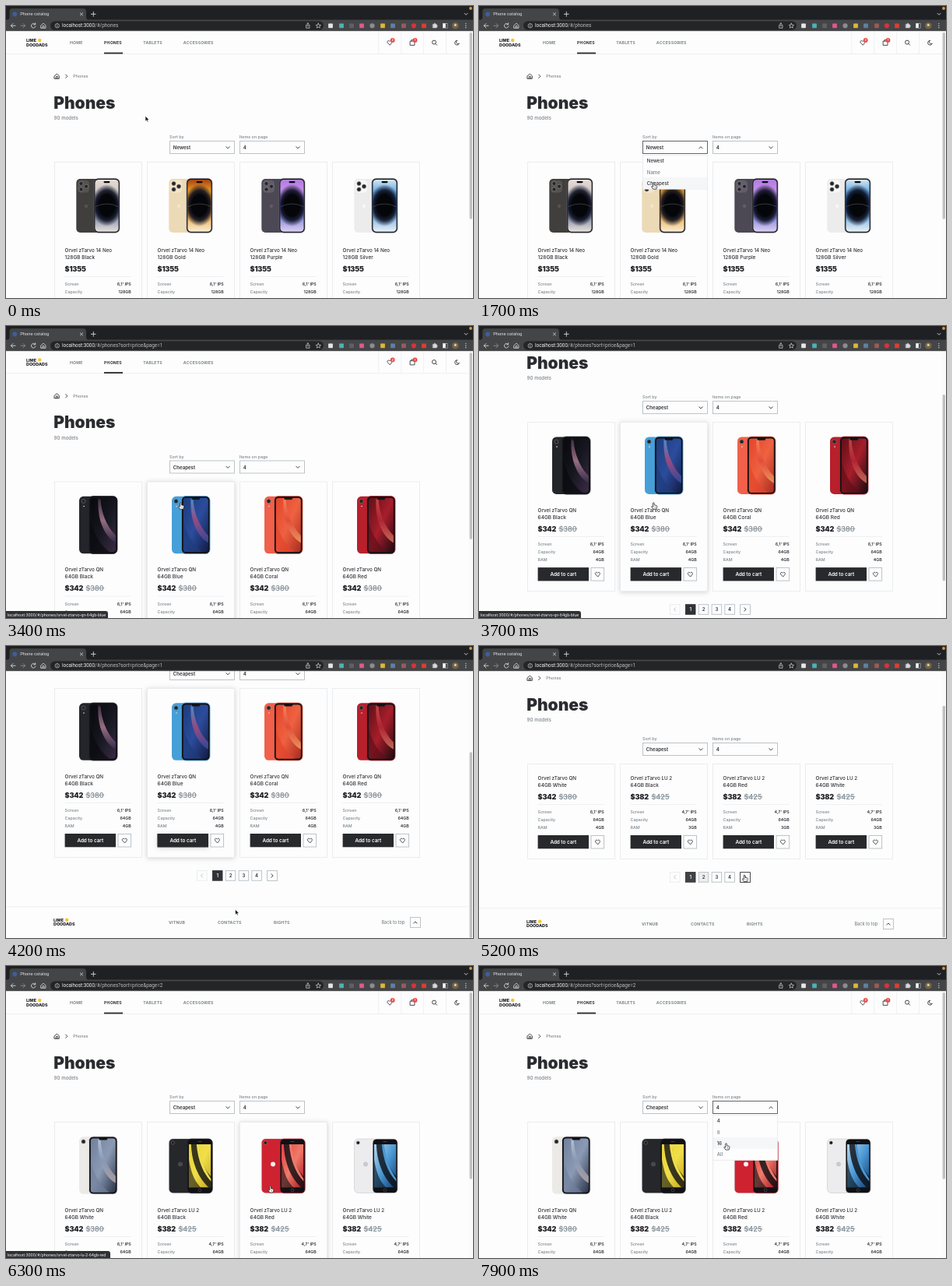
Write an HTML page that moves like this. It is 600 px wide and 375 px high and loops after 8000 ms.

```html
<!DOCTYPE html>
<html lang="en">
<head>
<meta charset="utf-8">
<title>Phone catalog</title>
<style>
html, body { margin: 0; width: 100%; height: 100%; overflow: hidden; background: #fdfdfd; }
svg { display: block; width: 600px; height: 375px; font-family: Inter, sans-serif; }
.url { font-family: Roboto, sans-serif; }
.caps { letter-spacing: .2px; }
.shade { filter: drop-shadow(0 1px 3px rgba(0, 0, 0, .17)); }
</style>
</head>
<body>
<svg id="stage" viewBox="0 0 600 375"></svg>
<script>
const LOOP = 8000, FOLD = 95;
const DARK = '#313237', GREY = '#7b848a', LINE = '#e8ebed', EDGE = '#b4bdc3', BAR = '#444547';
const CARD_X = [62, 181, 300, 419];
const stage = document.getElementById('stage');

// drawing helpers
const text = (x, y, s, size, weight = 500, fill = DARK, extra = '') =>
  `<text x="${x}" y="${y}" font-size="${size}" font-weight="${weight}" fill="${fill}" ${extra}>${s}</text>`;
const rect = (x, y, w, h, fill, extra = '') =>
  `<rect x="${x}" y="${y}" width="${w}" height="${h}" fill="${fill}" ${extra}/>`;
const dot = (x, y, r, fill, extra = '') => `<circle cx="${x}" cy="${y}" r="${r}" fill="${fill}" ${extra}/>`;
const path = (d, stroke = DARK, width = 1, extra = 'fill="none"') =>
  `<path d="${d}" stroke="${stroke}" stroke-width="${width}" stroke-linecap="round" stroke-linejoin="round" ${extra}/>`;
const box = (x, y, w, h, stroke, extra = '') => rect(x, y, w, h, '#fdfdfd', `stroke="${stroke}" stroke-width=".9" ${extra}`);
const group = (id, s, extra = '') => `<g id="${id}" ${extra}>${s}</g>`;
const at = (x, y, s) => `<g transform="translate(${x} ${y})">${s}</g>`;
const chevron = (x, y, dx, dy, color = DARK) => dy
  ? path(`M${x - 2.2} ${y - dy}L${x} ${y + dy}L${x + 2.2} ${y - dy}`, color, .9)
  : path(`M${x - dx} ${y - 2.2}L${x + dx} ${y}L${x - dx} ${y + 2.2}`, color, .9);
const heart = (x, y) => at(x, y, path('M0 2.8L-2.7 0C-4 -1.7 -1.6 -4 0 -1.8C1.6 -4 4 -1.7 2.7 0Z', DARK, .85));

let defs = '', gradients = 0;
function gradient(colors, diagonal) {
  const id = 'g' + gradients++;
  const stops = colors.map((c, i) => `<stop offset="${i / (colors.length - 1)}" stop-color="${c}"/>`).join('');
  defs += `<linearGradient id="${id}" x2="${diagonal ? 1 : 0}" y2="1">${stops}</linearGradient>`;
  return `url(#${id})`;
}

// phone pictures, relative to the left edge of a card
function proPhone(back, lens, screen) {
  const lenses = [[34.5, 228], [34.5, 235.5], [41, 231.7]].map(([x, y]) =>
    dot(x, y, 2.6, '#24252a', 'stroke="#8b8785" stroke-width=".7"')).join('');
  const panel = fill => rect(52.4, 222.9, 30.2, 66.9, fill, 'rx="4.5"');
  return rect(28.3, 222, 30, 69, back, 'rx="5"') + rect(30, 223.7, 15, 16, lens, 'rx="4.5"') + lenses +
    dot(41, 257, 2.2, lens) +
    rect(51, 221.5, 33, 69.7, '#15161a', 'rx="5.5" stroke="#77767a" stroke-width=".5"') +
    panel(gradient(screen)) + panel('url(#core)') +
    path('M53 257.5Q67.5 250.5 82 257.5', '#c3c8de', .5, 'fill="none" opacity=".5"') +
    rect(63.5, 225, 8, 2.2, '#08080a', 'rx="1.1"');
}
function xrPhone(back, screen, glow) {
  return rect(32, 219.3, 32, 73.5, back, 'rx="5.5"') + dot(37.5, 225.5, 2.5, '#222328', 'stroke="#777" stroke-width=".6"') +
    dot(38, 232, .8, '#e8e4d8') +
    rect(44.5, 219, 36.5, 74, '#111216', `rx="5.5" stroke="${back}" stroke-width=".8"`) +
    at(46.6, 221.2, `<g clip-path="url(#xr)">${rect(0, 0, 32.3, 69.6, gradient(screen, true))}
      <path d="M10 0C8 28 18 50 33 58V49C23 40 13 20 13 0Z" fill="${gradient(glow)}" opacity=".75"/>
      <path d="M0 28C4 48 14 62 25 70H0Z" fill="${screen[0]}" opacity=".65"/></g>`) +
    path('M57 220.8H68.5L67.3 223.3H58.2Z', '#111216', .4, 'fill="#111216"');
}
function sePhone(back, mark, face, colors) {
  return rect(28.5, 222, 30, 69.5, back, 'rx="5" stroke="#999" stroke-width=".3"') + dot(33.3, 227, 2.1, '#17181c', 'stroke="#888" stroke-width=".5"') +
    dot(43, 254.5, 3, mark) +
    rect(52, 222, 32.2, 69.7, face, `rx="5" stroke="${back}" stroke-width=".8"`) +
    at(53.8, 229, `<g clip-path="url(#se)">${rect(0, 0, 28.6, 55.5, gradient(colors, true))}
      <path d="M3 0C4 24 12 43 26 56H29V42C20 32 13 16 13 0Z" fill="#0d0e13" opacity=".8"/>
      <path d="M10 0C12 22 19 38 29 48V45C21 33 14 17 13 0Z" fill="${colors[1]}"/>
      <path d="M0 18C3 38 8 48 16 56H0Z" fill="#0d0e13" opacity=".6"/></g>`) +
    dot(68, 288, 1.9, 'none', 'stroke="#777" stroke-width=".4"') + rect(65.5, 225.3, 5, .7, '#555');
}

const PRO = 'zTarvo 14 Neo', XR = 'zTarvo QN', SE = 'zTarvo LU 2';
const pro = (color, ...look) => ({ model: PRO, spec: '128GB ' + color, price: '$1355', size: "6,1' IPS", mem: '128GB', ram: '6GB', pic: proPhone(...look) });
const xr = (color, ...look) => ({ model: XR, spec: '64GB ' + color, price: '$342', was: '$380', size: "6,1' IPS", mem: '64GB', ram: '4GB', pic: xrPhone(...look) });
const se = (color, ...look) => ({ model: SE, spec: '64GB ' + color, price: '$382', was: '$425', size: "4,7' IPS", mem: '64GB', ram: '3GB', pic: sePhone(...look) });

const sets = [
  [
    pro('Black', '#413f3d', '#55524f', ['#e4dcd6', '#cfc6c4', '#4a5578', '#8f97ad', '#e6dfda']),
    pro('Gold', '#ecd9b6', '#f3e5ca', ['#a8430f', '#f2a92f', '#e2861f', '#f0b867', '#f8ecd2']),
    pro('Purple', '#4c4854', '#625c6b', ['#b27be0', '#c795ee', '#5a50b0', '#8f92dc', '#dccdf2']),
    pro('Silver', '#ececec', '#f7f7f6', ['#d5e6f3', '#5fa6e4', '#2f6fc0', '#8cbce8', '#e8f0f5'])
  ], [
    xr('Black', '#24252a', ['#08090c', '#15161f', '#3a2c44'], ['#4d3554', '#c08aa0', '#342b50']),
    xr('Blue', '#479fd8', ['#1c3d7c', '#2c4c9c', '#121c46'], ['#56a5e4', '#b94a74', '#3651ad']),
    xr('Coral', '#f0604a', ['#e5432c', '#ee6240', '#a92b20'], ['#f79a66', '#e0473a', '#f6b36c']),
    xr('Red', '#b8202c', ['#5f0f18', '#a61e2b', '#220a10'], ['#e1584f', '#b42636', '#e88a6d'])
  ], [
    xr('White', '#eceae6', ['#70809d', '#8b9ab4', '#2b3448'], ['#cbd6e6', '#8796b4', '#c9b8b2']),
    se('Black', '#26272b', '#47484d', '#101115', ['#e8d236', '#f0df4a', '#c3a51c']),
    se('Red', '#cf2231', '#f6eeee', '#101115', ['#e2423f', '#f07a6a', '#a4141f']),
    se('White', '#ececee', '#c9cace', '#101115', ['#b9d8ea', '#4a98d4', '#123a6c'])
  ]
];

function card(p, i) {
  const row = (y, name, value) => text(13.6, y, name, 5.3, 500, GREY) +
    text(98.8, y, value, 5.3, 600, DARK, 'text-anchor="end"');
  const old = p.was ? text(40.5, 340.5, p.was, 9, 600, '#89939a') + rect(40.3, 336.8, 24, .8, '#89939a') : '';
  const info = text(13.6, 315.6, 'Orvel ' + p.model, 6.3) + text(13.6, 324.8, p.spec, 6.5) +
    text(13.6, 340.5, p.price, 9.1, 900, '#222327', 'letter-spacing="-.2"') + old + rect(13.6, 347.2, 85, .7, LINE) +
    row(359, 'Screen', p.size) + row(369, 'Capacity', p.mem) + row(379, 'RAM', p.ram) +
    rect(13.6, 387, 65.4, 17.3, '#28292c') +
    text(46.3, 398, 'Add to cart', 6.3, 600, '#fff', 'text-anchor="middle"') +
    box(82, 387.4, 16.6, 16.6, EDGE) + heart(90.4, 395.9);
  return at(CARD_X[i], 0, `<g class="pic">${p.pic}</g><g class="fold">${info}</g>`).replace('translate(', 'translate(');
}

const logo = (x, y) => text(x, y, 'LIME', 5.4, 800, '#1f2024') + text(x, y + 5.5, 'DOODADS', 5.4, 800, '#1f2024') +
  dot(x + 17.2, y - 2, 2.3, '#f3c73c');
const caps = (x, y, s, fill = GREY) => text(x, y, s, 5.2, 700, fill, 'class="caps"');
const home = (x, y, color, width) => path(`M${x - 3} ${y - .4}L${x} ${y - 3}L${x + 3} ${y - .4}V${y + 3.1}H${x - 3}ZM${x - 1} ${y + 3}V${y + .4}H${x + 1}V${y + 3}`, color, width);
const badge = (x, n) => dot(x, 43.9, 2.9, '#eb4848') + text(x, 45.3, n, 3.8, 600, '#fff', 'text-anchor="middle"');

function header() {
  return rect(0, 32, 600, 29.5, '#fdfdfd') + rect(0, 61, 600, .8, LINE) + logo(26, 46) +
    caps(82, 49, 'HOME') + caps(126, 49, 'PHONES', DARK) + caps(176.3, 49, 'TABLETS') + caps(227.8, 49, 'ACCESSORIES') +
    rect(126, 59.6, 24, 1.9, DARK) +
    [478.5, 507.5, 536, 565].map(x => rect(x, 33, .7, 28, LINE)).join('') +
    heart(493, 47.2) + badge(496.7, 2) +
    path('M519.5 45.2H525V50.4H519.5ZM520.8 45V43.6H523.7V45', DARK, .85) + badge(525.5, 1) +
    dot(550, 46.6, 2.5, 'none', `stroke="${DARK}" stroke-width=".9"`) + path('M552 48.6L553.6 50.2', DARK, .9) +
    path('M579.4 44.3A2.9 2.9 0 1 0 582.3 48A2.3 2.3 0 0 1 579.4 44.3Z', DARK, .85);
}

const PAGER_X = [265, 281.8, 298.7, 315.4];
function lower() {
  const pages = PAGER_X.map((x, i) => box(x + .4, 434.6, 12.6, 12.6, EDGE, `id="p${i}"`) +
    text(x + 6.7, 443.1, i + 1, 6, 600, DARK, `text-anchor="middle" id="n${i}"`)).join('');
  return box(245.4, 434.6, 12.6, 12.6, LINE) + chevron(251.6, 440.9, -1.1, 0, EDGE) + pages +
    box(335.6, 434.6, 12.8, 12.8, EDGE, 'id="next"') + chevron(342, 440.9, 1.1, 0) +
    rect(0, 480.4, 600, .8, LINE) + logo(61, 499.8) +
    caps(209, 503, 'VITNUB') + caps(272, 503, 'CONTACTS') + caps(344, 503, 'RIGHTS') +
    text(482.5, 503, 'Back to top', 5.5, 500, GREY) + box(519.4, 494.6, 13, 13, EDGE) + chevron(525.9, 501, 0, -1.1);
}

function select(id, x, label) {
  return text(x, 170, label, 5.4, 500, GREY) + box(x + .5, 173.5, 83, 16, EDGE, `id="${id}Box"`) +
    text(x + 4.8, 184, '', 6.1, 600, DARK, `id="${id}Text"`) +
    group(id + 'Down', chevron(x + 75, 181.8, 0, 1.1)) + group(id + 'Up', chevron(x + 75, 181.8, 0, -1.1));
}
const ROW = 14.3, MENU_Y = 191.6;
function menu(id, x, items) {
  return group(id + 'Menu', box(x + .5, MENU_Y, 83, items.length * ROW + .6, LINE) +
    items.map((s, i) => rect(x + 1, MENU_Y + i * ROW, 82, ROW, '#f5f6f7', `id="${id}Bg${i}"`) +
      text(x + 5.8, MENU_Y + i * ROW + 9.6, s, 6.1, 500, GREY, `id="${id}Item${i}"`)).join(''));
}

function chrome() {
  const pale = '#d5d7da', dim = '#8b8d91';
  const addons = [[417, '#e4e5e6'], [431, '#4fb0b4'], [444, '#5e6064'], [457, '#e0568f'], [470.5, '#8a8c90'], [484, '#d9b935'],
    [497, '#5d7fa3'], [511, '#9a5a58'], [524, '#d8323a'], [537, '#d9402f']];
  return rect(0, 0, 600, 18, '#1f2023') + rect(0, 17.6, 600, 14.6, BAR) +
    `<path d="M1 18Q4.5 18 4.5 14V7Q4.5 3.2 8 3.2H99.5Q103 3.2 103 7V14Q103 18 106.5 18Z" fill="${BAR}"/>` +
    dot(11.2, 10.4, 3, '#3a5f9e') + text(18.2, 12.4, 'Phone catalog', 5.8, 400, '#dfe1e4', 'class="url"') +
    path('M95.4 8.8L98.6 12M98.6 8.8L95.4 12', pale, .8) + path('M109.4 10.4H115.2M112.3 7.5V13.3', pale, .9) +
    path('M589 9.4L591 11.4L593 9.4', pale, .9) + dot(597, 3, 1.9, '#ef9431') +
    path('M12 25.3H6.5M9 22.6L6.3 25.3L9 28', pale, .9) + path('M19 25.3H24.5M22 22.6L24.7 25.3L22 28', dim, .9) +
    path('M37.3 23.4A2.8 2.8 0 1 0 38 26M37.7 21.8V23.8H35.7', pale, .9) + home(48, 25.2, pale, .8) +
    rect(57, 19.4, 351, 11.4, '#242527', 'rx="5.7"') +
    dot(65.8, 25.3, 2.7, 'none', `stroke="${pale}" stroke-width=".7"`) + rect(65.4, 24.9, .8, 1.8, pale) + rect(65.4, 23.5, .8, .8, pale) +
    text(72, 27.4, '<tspan fill="#f1f2f4">localhost:3000</tspan><tspan id="address"></tspan>', 6.4, 400, '#b9bcc0', 'class="url"') +
    path('M386.6 24.6H385.6V28.3H390V24.6H389M387.8 26.3V21.9M386.5 23.1L387.8 21.8L389.1 23.1', pale, .7) +
    path('M401.3 22.2L402.2 24.3L404.5 24.5L402.8 26L403.3 28.2L401.3 27L399.3 28.2L399.8 26L398.1 24.5L400.4 24.3Z', pale, .7) +
    addons.map(([x, c], i) => i === 4 || i === 8 ? dot(x, 25.3, 3.1, c) : rect(x - 2.9, 22.4, 5.8, 5.8, c, 'rx=".8"')).join('') +
    path('M548.5 23.5H550V22.4H551.7V23.5H553.3V25H554.2V26.5H553.3V28H548.5Z', pale, .5, `fill="${pale}"`) +
    box(561.5, 22.6, 5.4, 5.4, pale) + rect(564.8, 22.6, 2.1, 5.4, BAR) +
    dot(577.3, 25.2, 4.3, '#766345') + dot(577.3, 24.4, 1.6, '#d7c9ad') +
    [22.6, 25.2, 27.8].map(y => dot(590.8, y, .7, pale)).join('');
}

defs += `<clipPath id="xr"><rect width="32.3" height="69.6" rx="4"/></clipPath>
  <clipPath id="se"><rect width="28.6" height="55.5"/></clipPath>
  <radialGradient id="core" gradientUnits="userSpaceOnUse" cx="0" cy="0" r="1" gradientTransform="translate(67.5 256) scale(20 27)">
    <stop offset=".5" stop-color="#050609"/><stop offset=".72" stop-color="#0a0e20" stop-opacity=".88"/>
    <stop offset="1" stop-color="#0a0e20" stop-opacity="0"/></radialGradient>`;
const sheet = header() + home(65.3, 90.2, DARK, .9) + chevron(77.8, 90.3, 1.1, 0) + text(86.2, 92.3, 'Phones', 5.4, 500, GREY) +
  text(61.2, 131.8, 'Phones', 21, 900, '#2b2c30') + text(61.6, 146, '90 models', 6.2, 500, GREY) +
  select('sort', 210, 'Sort by') + select('count', 300, 'Items on page') +
  CARD_X.map((x, i) => box(x + .5, 200.5, 112, 217, LINE, `id="frame${i}"`)).join('') +
  box(0, 200.5, 112, 217, LINE, 'id="lift" class="shade"') +
  rect(194.6, 387, 65.4, 17.3, '#28292c', 'id="buyLift" class="shade"') +
  sets.map((set, i) => group('set' + i, set.map(card).join(''))).join('') + group('lower', lower()) +
  menu('sort', 210, ['Newest', 'Name', 'Cheapest']) + menu('count', 300, ['4', '8', '16', 'All']);
const arrow = path('M0 0V6.6L1.6 5.2L2.7 7.5L3.8 7L2.8 4.8H4.8Z', '#fff', .6, 'fill="#111"');
const hand = path('M-.8 .6Q0 -.5 .8 .6V3.2L3.6 3.8Q4.6 4.1 4.4 5.2L3.6 8.6H-.6L-2.8 5.3Q-2.5 4.2 -.8 5.3Z', '#111', .7, 'fill="#fff"') +
  path('M2 5V7', '#111', .4);
stage.innerHTML = `<defs>${defs}</defs>` + rect(0, 0, 600, 375, '#fdfdfd') + group('page', sheet) +
  rect(594.5, 32, 5.5, 343, '#fafafa') + rect(595.6, 34, 3.4, 240, '#bfc0c2', 'rx="1.7" id="thumb"') +
  group('status', '<path id="statusBg" fill="#303135"/>' + text(1.6, 372.6, '', 5.5, 400, '#eef0f2', 'class="url" id="link"')) +
  chrome() + group('cursor', group('arrow', arrow) + group('hand', hand));

// timeline
const el = {};
stage.querySelectorAll('[id]').forEach(n => el[n.id] = n);
const pics = stage.querySelectorAll('.pic'), folds = stage.querySelectorAll('.fold');
const show = (id, on) => el[id].setAttribute('visibility', on ? 'visible' : 'hidden');
const set = (id, name, value) => el[id].setAttribute(name, value);
const within = (t, a, b) => t >= a && t < b;
const ease = (t, a, b) => { const k = Math.min(1, Math.max(0, (t - a) / (b - a))); return k * k * (3 - 2 * k); };
const mix = (a, b, k) => a + (b - a) * k;
function track(keys, t) {
  let i = 0;
  while (i < keys.length - 2 && t >= keys[i + 1][0]) i++;
  const [a, b] = [keys[i], keys[i + 1]], k = ease(t, a[0], b[0]);
  return a.slice(1).map((v, j) => mix(v, b[j + 1], k));
}
const shadeOf = k => `rgb(${[[253, 49], [253, 50], [253, 55]].map(([a, b]) => Math.round(mix(a, b, k)))})`;

const SCROLL = [[0, 0], [3380, 0], [4000, 146], [5149, 146], [5150, 49], [5350, 49], [5720, 0], [LOOP, 0]];
const POINTER = [[0, 179, 141.5], [250, 179, 141.5], [900, 238, 179], [1150, 238, 179], [1650, 224.3, 226.6], [3800, 224.3, 226.6],
  [4180, 294.5, 338.5], [4350, 294.5, 338.5], [4900, 341, 294], [5800, 341, 294], [6250, 339.5, 282.5], [6600, 339.5, 282.5],
  [7050, 343, 179], [7250, 343, 179], [7800, 317.5, 227.5], [LOOP, 317.5, 227.5]];

function drop(id, count, open, value, y) {
  set(id + 'Box', 'stroke', open ? '#55565b' : EDGE);
  el[id + 'Text'].textContent = value;
  show(id + 'Down', !open);
  show(id + 'Up', open);
  el[id + 'Menu'].style.display = open ? '' : 'none';
  const over = Math.floor((y - MENU_Y) / ROW);
  for (let i = 0; i < count; i++) {
    show(`${id}Bg${i}`, open && i === over);
    set(`${id}Item${i}`, 'fill', i === over || i === 0 ? DARK : GREY);
  }
}

function draw(t) {
  const current = t < 1900 ? 0 : t < 5150 ? 1 : 2;
  const folded = within(t, 1900, 2100) || within(t, 5150, 5350);
  const shift = folded ? -FOLD : 0, [scroll] = track(SCROLL, t), [x, y] = track(POINTER, t);

  set('page', 'transform', `translate(0 ${-scroll})`);
  sets.forEach((_, i) => el['set' + i].style.display = i === current ? '' : 'none');
  pics.forEach(p => p.style.display = folded ? 'none' : '');
  folds.forEach(f => f.setAttribute('transform', `translate(0 ${shift})`));
  set('lower', 'transform', `translate(0 ${shift})`);
  CARD_X.forEach((_, i) => set('frame' + i, 'height', 217 + shift));

  const left = t < 5000;
  const lift = left ? ease(t, 1850, 2050) * (1 - ease(t, 4200, 4450)) : ease(t, 5720, 5900) * (1 - ease(t, 6850, 7000));
  set('lift', 'x', CARD_X[left ? 1 : 2] + .5);
  set('lift', 'height', 217 + shift);
  set('lift', 'opacity', lift);
  set('buyLift', 'opacity', ease(t, 3800, 4000) * (1 - ease(t, 4250, 4450)));

  drop('sort', 3, within(t, 1050, 1850), t < 1850 ? 'Newest' : 'Cheapest', y);
  drop('count', 4, t >= 7200, '4', y);

  const turn = ease(t, 5150, 5450);
  [1 - turn, turn, 0, 0].forEach((k, i) => {
    set('p' + i, 'fill', shadeOf(k));
    set('p' + i, 'stroke', k > .5 ? DARK : EDGE);
    set('n' + i, 'fill', k > .5 ? '#fff' : DARK);
  });
  set('next', 'stroke', within(t, 4820, 5400) ? DARK : EDGE);

  const total = 488 + shift;
  set('thumb', 'y', 34 + scroll * 342 / total);
  set('thumb', 'height', Math.min(342 * 342 / total, 341 - scroll * 342 / total));

  el.address.textContent = '/#/phones' + (t < 1900 ? '' : '?sort=price&page=' + (t < 5250 ? 1 : 2));
  const blue = within(t, 1850, 3900), red = within(t, 5900, 6880);
  el.status.style.display = blue || red ? '' : 'none';
  el.link.textContent = 'localhost:3000/#/phones/orvel-ztarvo-' + (blue ? 'qn-64gb-blue' : 'lu-2-64gb-red');
  const edge = blue ? 131 : 134;
  set('statusBg', 'd', `M0 366H${edge - 3}Q${edge} 366 ${edge} 369V375H0Z`);

  const pointing = within(t, 800, 3900) || t >= 4780;
  set('cursor', 'transform', `translate(${x} ${y})`);
  show('hand', pointing);
  show('arrow', !pointing);
}

const start = performance.now();
function tick() {
  draw((performance.now() - start) % LOOP);
  requestAnimationFrame(tick);
}
tick();
</script>
</body>
</html>
```
